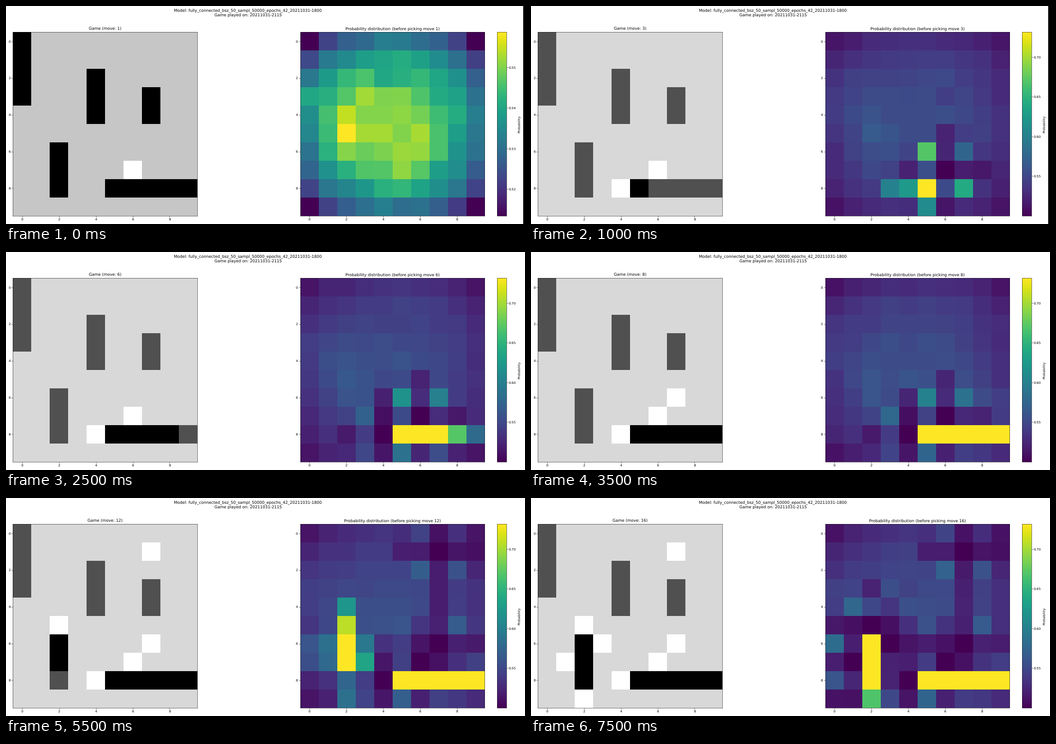
These frames come from a looping animation (1153x486 px, 8000 ms). A matplotlib script:

```python
import numpy as np
import matplotlib.pyplot as plt
from matplotlib.animation import FuncAnimation
from matplotlib.patches import Rectangle

W, H, DPI = 1153, 486, 64
K = 53.1 / DPI  # shrinks the default style to the stage
TOP, SIDE = 58.4, 409.5
plt.rcParams.update({
    "font.family": "DejaVu Sans", "font.size": 10 * K, "text.hinting": "none",
    "axes.linewidth": 0.8 * K, "axes.titlepad": 6 * K, "axes.labelpad": 4 * K,
})
for tick in ("xtick", "ytick"):
    plt.rcParams.update({f"{tick}.major.{k}": v * K for k, v in
                         (("size", 3.5), ("width", 0.8), ("pad", 3.5))})

N = 10
HIT, SHIP, SEA, MISS = 0, 0.314, 0.847, 1
SHIPS = [(0, 0, 4, 1), (2, 4, 3, 1), (3, 7, 2, 1), (6, 2, 3, 1), (8, 5, 1, 5)]
PICKS = [(7, 6), (8, 5), (8, 4), (8, 7), (8, 6), (8, 8), (8, 9), (6, 7),
         (1, 7), (7, 2), (6, 2), (5, 2), (6, 3), (7, 1), (8, 2), (9, 2)]

STEPS = [(1, 0), (-1, 0), (0, 1), (0, -1)]
DIAGONALS = [(1, 1), (1, -1), (-1, 1), (-1, -1)]

# Level at the corners and rise towards the middle, by move
DOMES = {1: (0.08, 0.37), 2: (0.24, 0.22)}
LATE_DOME = (0.05, 0.09)
GLOWS = [(5, 2, 0.35), (3, 0, 0.35), (6.5, 5.5, 0.15)]  # row, column, gain

# Colour range and tick step, by move
SCALES = {1: (0.5134, 0.5587, 0.01), 2: (0.5002, 0.5729, 0.01),
          4: (0.5003, 0.7255, 0.025)}
LATE_SCALE = (0.5, 0.7313, 0.05)


def board(picks):
    cells = np.full((N, N), SEA)
    for r, c, h, w in SHIPS:
        cells[r:r + h, c:c + w] = SHIP
    for p in picks:
        cells[p] = HIT if cells[p] == SHIP else MISS
    return cells


def inside(r, c):
    return 0 <= r < N and 0 <= c < N


def run_length(cells, r, c, dr, dc):
    """Number of joined hits through (r, c) along one axis."""
    count = 1
    for s in (1, -1):
        k = s
        while inside(r + k * dr, c + k * dc) and cells[r + k * dr, c + k * dc] == HIT:
            count += 1
            k += s
    return count


def dome(move):
    corner, rise = DOMES.get(move, LATE_DOME)
    curve = np.abs(np.sin(np.pi * np.arange(N) / (N - 1))) ** 0.7
    level = corner + rise * np.add.outer(curve, curve)
    r, c = np.indices((N, N))
    for gr, gc, gain in GLOWS:
        level *= 1 + gain * np.exp(-(r - gr) ** 2 / 3 - (c - gc) ** 2)
    return level * np.random.default_rng(move).normal(1, 0.05, (N, N))


def levels(move):
    """Hits lift the cells in line; misses dim their cross, lift diagonals."""
    picks = PICKS[:move - 1]
    cells = board(picks)
    level = dome(move)
    factor = np.ones((N, N))
    for r, c in picks:
        hit = cells[r, c] == HIT
        for dr, dc in STEPS:
            run = run_length(cells, r, c, dc, dr) if hit else 1
            for k, gain in ((1, 0.35), (2, 0.25)):
                p = r + k * dr, c + k * dc
                if inside(*p) and hit:
                    level[p] += gain / run
                elif inside(*p):
                    factor[p] *= 0.42
        for dr, dc in DIAGONALS:
            if not hit and inside(r + dr, c + dc):
                factor[r + dr, c + dc] *= 1.5
    level = np.minimum(level * factor, 0.98)
    level[cells == HIT] = 0.99
    level[cells == MISS] = 0
    return (level - level.min()) / np.ptp(level)


def add_axes(x, w):
    return fig.add_axes([x / W, 1 - (TOP + SIDE) / H, w / W, SIDE / H])


def add_grid(x, cmap):
    ax = add_axes(x, SIDE)
    im = ax.imshow(np.zeros((N, N)), cmap=cmap, vmin=0, vmax=1,
                   interpolation="nearest", aspect="auto")
    ax.set_xticks(range(0, N, 2))
    ax.set_yticks(range(0, N, 2))
    return ax, im


fig = plt.figure(figsize=(W / DPI, H / DPI), dpi=DPI, facecolor="white")
fig.text(537.5 / W, 1 - 15.3 / H,
         "Model: fully_connected_bsz_50_sampl_50000_epochs_42_20211031-1800\n"
         "Game played on: 20211031-2115",
         fontsize="large", ha="center", va="center", linespacing=1.26)
game_ax, game = add_grid(15.4, "gray")
prob_ax, prob = add_grid(653.8, "viridis")
bar = fig.colorbar(prob, cax=add_axes(1091.2, SIDE / 20))
bar.set_label("Probability")
strip = fig.add_artist(Rectangle((1149 / W, 0), 4 / W, 1, color="black", lw=0,
                                 transform=fig.transFigure))


def update(i):
    move = i + 1
    cells = board(PICKS[:move])
    game.set_data(cells)
    game.set_clim(cells.min(), MISS)
    game_ax.set_title(f"Game (move: {move})")

    lo, hi, step = SCALES.get(move, LATE_SCALE)
    prob.set_data(lo + (hi - lo) * levels(move))
    prob.set_clim(lo, hi)
    prob_ax.set_title(f"Probability distribution (before picking move {move})")
    ticks = np.arange(np.floor(lo / step + 1e-6) + 1, np.floor(hi / step) + 1) * step
    digits = 3 if step == 0.025 else 2
    bar.set_ticks(ticks, labels=[f"{t:.{digits}f}" for t in ticks])
    strip.set_visible(move < 4)


anim = FuncAnimation(fig, update, frames=len(PICKS), interval=500,
                     repeat=True, repeat_delay=0)
plt.show()
```
